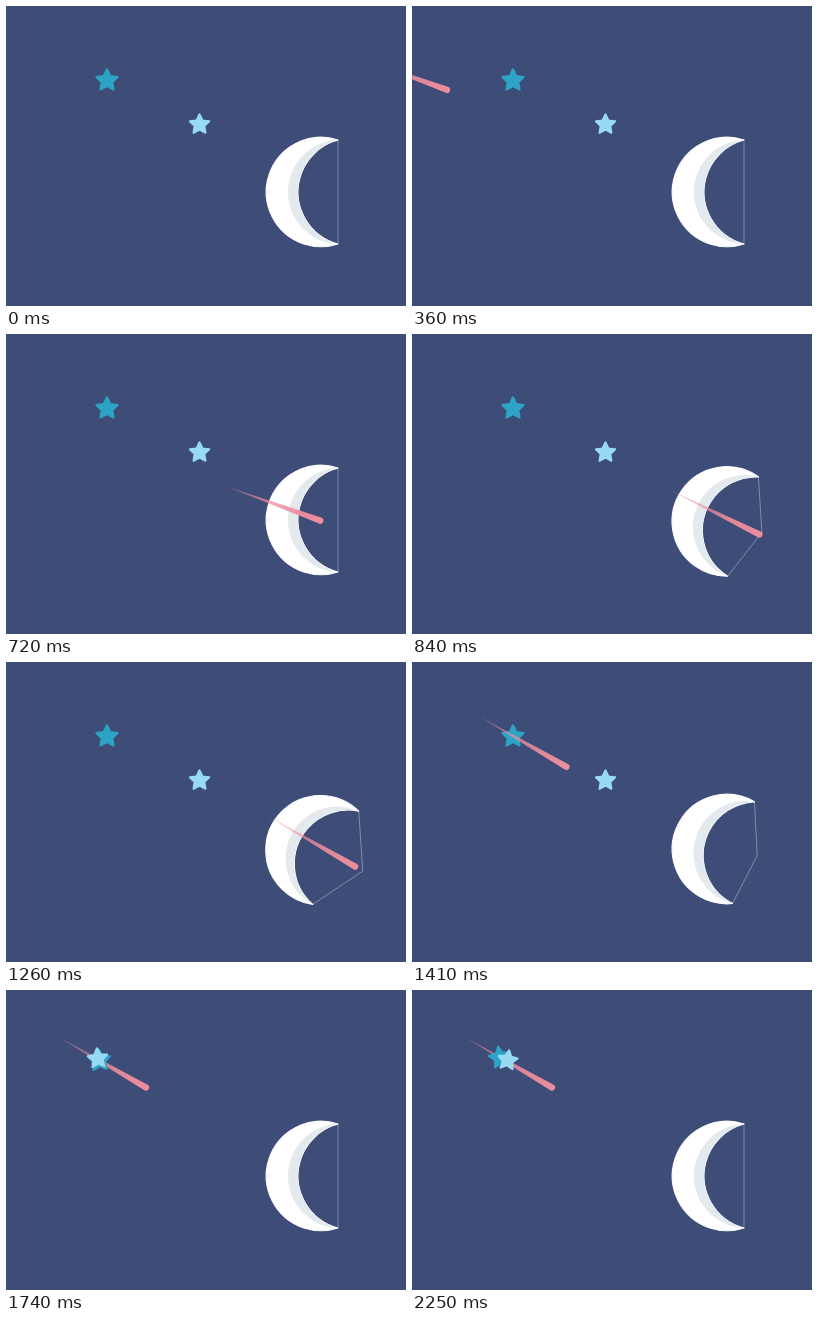
An HTML page with a canvas that plays this animation: 400x300 px, repeating every 2280 ms.

```html
<!DOCTYPE html>
<html lang="en">
<head>
<meta charset="utf-8">
<title>Moon bow</title>
<style>
html, body { margin: 0; width: 100%; height: 100%; overflow: hidden; background: #3e4c78; }
canvas { display: block; width: 400px; height: 300px; }
</style>
</head>
<body>
<canvas id="stage" width="400" height="300"></canvas>
<script>
const ctx = document.getElementById('stage').getContext('2d');
const LOOP = 2280, RELEASE = 1145, RAD = Math.PI / 180;
const PIVOT = { x: 310, y: 186 };
const MAX_TURN = 27 * RAD, MAX_PULL = 31;

const clamp = v => Math.min(1, Math.max(0, v));
const mix = (a, b, p) => a + (b - a) * p;
const span = (t, from, to) => clamp((t - from) / (to - from));
const easeInOut = (p, n) => p < 0.5 ? (2 * p) ** n / 2 : 1 - (2 - 2 * p) ** n / 2;
const move = (t, from, to, n = 3) => easeInOut(span(t, from, to), n);

// How far the bow is drawn, and where the comet's head is
function pose(t) {
  if (t < RELEASE) {
    const x = mix(-6, 355, move(t, 80, 1002));
    const draw = clamp((x - 329.5) / 25.2) ** 1.3;
    return { draw, x, y: 71 + 0.368 * x + 6 * draw ** 3, angle: (20 + 10 * draw) * RAD };
  }
  const p = move(t, 1152, 1541, 5);
  return {
    draw: 1 - move(t, 1174, 1633),
    x: mix(355, 140, p), y: mix(207.6, 97.5, p), angle: 30 * RAD
  };
}

// Crescent whose inner edge bulges left of the chord by the given depth
function crescent(depth, outer) {
  const r = (52 * 52 + depth * depth) / (2 * depth);
  const cx = 22 - depth + r;
  const a = Math.atan2(52, 22 - cx);
  ctx.beginPath();
  if (outer) {
    const b = Math.atan2(52, 17);
    ctx.arc(5, 0, 54.7, -b, b, true);
  } else {
    const r2 = (52 * 52 + 1600) / 80, cx2 = r2 - 18;
    const b = Math.atan2(52, 22 - cx2);
    ctx.arc(cx2, 0, r2, -b, b, true);
  }
  ctx.arc(cx, 0, r, a, -a);
  ctx.closePath();
}

function moon(draw) {
  ctx.save();
  ctx.translate(PIVOT.x, PIVOT.y);
  ctx.rotate(MAX_TURN * draw);
  ctx.beginPath();
  ctx.moveTo(22, -52);
  ctx.lineTo(22 + MAX_PULL * draw, 0);
  ctx.lineTo(22, 52);
  ctx.strokeStyle = 'rgba(255,255,255,.4)';
  ctx.lineWidth = 0.8;
  ctx.stroke();
  crescent(40, true);
  ctx.fillStyle = ctx.strokeStyle = '#fff';
  ctx.lineWidth = 1.2;
  ctx.lineJoin = 'round';
  ctx.fill();
  ctx.stroke();
  crescent(50, false);
  ctx.fillStyle = '#e4e9ee';
  ctx.fill();
  ctx.restore();
}

function comet({ x, y, angle }) {
  ctx.save();
  ctx.translate(x, y);
  ctx.rotate(angle);
  const fade = ctx.createLinearGradient(-101, 0, 3, 0);
  fade.addColorStop(0, 'rgba(240,145,160,.3)');
  fade.addColorStop(0.65, 'rgba(238,142,158,.9)');
  fade.addColorStop(1, '#ee8e9e');
  ctx.fillStyle = fade;
  ctx.beginPath();
  ctx.moveTo(-101, 0);
  ctx.lineTo(0, -3.2);
  ctx.arc(0, 0, 3.2, -Math.PI / 2, Math.PI / 2);
  ctx.closePath();
  ctx.fill();
  ctx.restore();
}

function star(x, y, r, tilt, color) {
  ctx.save();
  ctx.translate(x, y);
  ctx.rotate(tilt * RAD);
  ctx.beginPath();
  for (let i = 0; i < 10; i++) {
    const a = (i * 36 - 90) * RAD, d = i % 2 ? r * 0.5 : r;
    ctx.lineTo(d * Math.cos(a), d * Math.sin(a));
  }
  ctx.closePath();
  ctx.fillStyle = ctx.strokeStyle = color;
  ctx.lineWidth = 2;
  ctx.lineJoin = 'round';
  ctx.fill();
  ctx.stroke();
  ctx.restore();
}

function stars(t) {
  const join = move(t, 1490, 1740), part = move(t, 1740, 2160);
  const path = (a, b, c) => mix(mix(a, b, join), c, part);
  star(path(101, 93.5, 88), path(74.5, 70.5, 67.5), 11.2, path(0, -4, -10), '#2da4c6');
  star(path(193.5, 91.7, 95.7), path(118.5, 68.5, 70.3), 10.2, path(0, -5, 8), '#98daf3');
}

function render(now) {
  const t = now % LOOP;
  const p = pose(t);
  ctx.fillStyle = '#3e4c78';
  ctx.fillRect(0, 0, 400, 300);
  moon(p.draw);
  if (t < 1490) {
    stars(t);
    comet(p);
  } else {
    comet(p);
    stars(t);
  }
}

const start = performance.now();
function frame() {
  render(performance.now() - start);
  requestAnimationFrame(frame);
}
frame();
</script>
</body>
</html>
```
